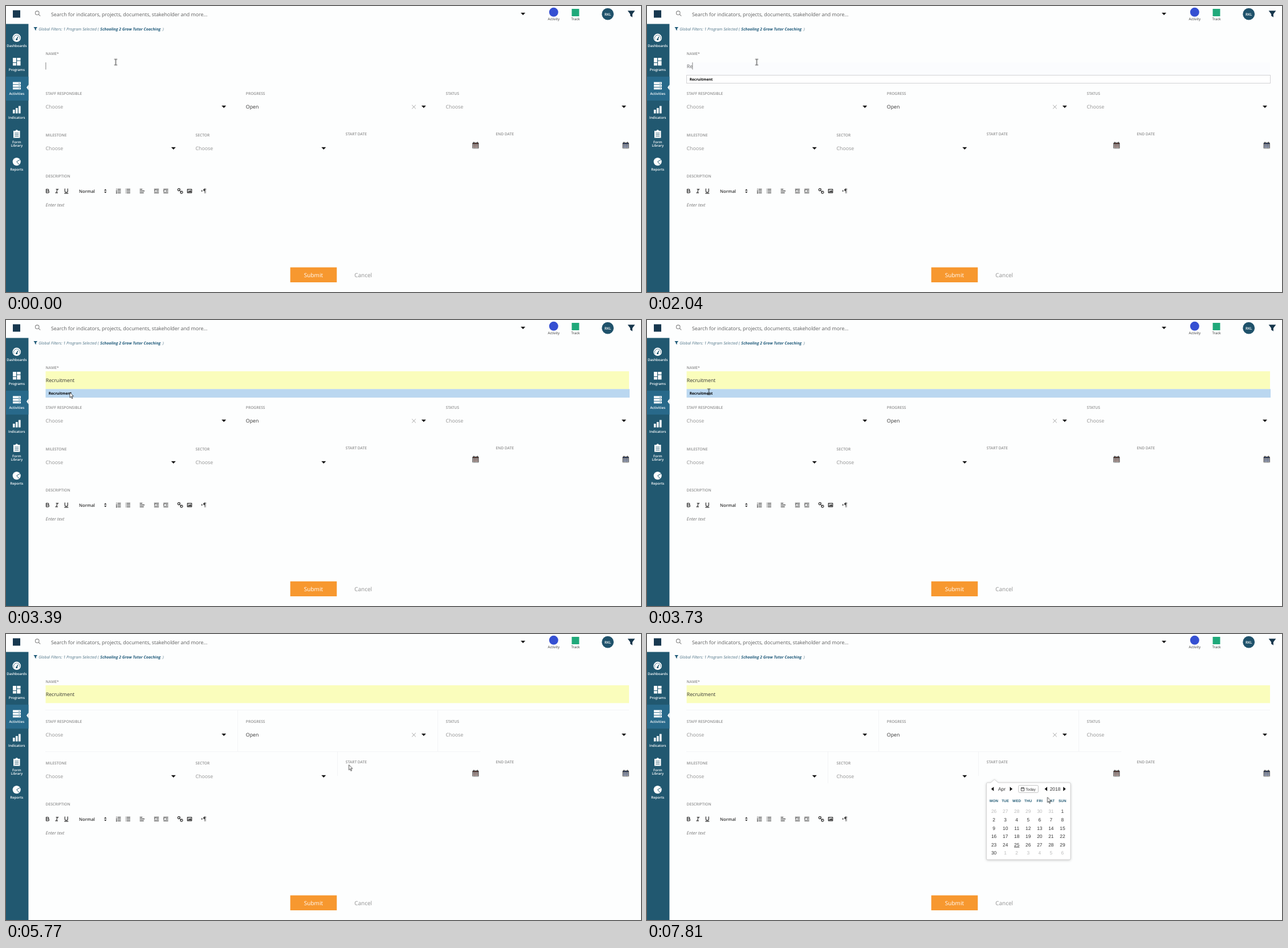
An HTML page for the animation above (8000 ms loop, 1114 by 502 pixels).

```html
<!DOCTYPE html>
<html lang="en">
<head>
<meta charset="utf-8">
<title>Activity form</title>
<style>
  html, body { margin: 0; width: 100%; height: 100%; overflow: hidden; background: #fdfefe; }
  svg { display: block; }
  text { font-family: "Open Sans", "Noto Sans", sans-serif; font-size: 8.8px; text-rendering: geometricPrecision; }
  .mid { text-anchor: middle; }
  .nav text { font-size: 6.1px; font-weight: 600; fill: #fff; text-anchor: middle; }
  .label text { font-size: 6.65px; font-weight: 600; fill: #8e8e8e; }
  .hint text { fill: #919191; }
  .small { font-size: 6.2px; fill: #333; }
  .filter { font-size: 6.9px; font-style: italic; fill: #4f7488; }
  .option { font-size: 6.45px; font-weight: 700; fill: #000; }
  .button { font-size: 10px; text-anchor: middle; }
  .tools { fill: none; stroke: #333; stroke-width: 2; stroke-linecap: round; stroke-linejoin: round; }
  .tools .solid { fill: #333; stroke-width: 1; }
  .lines { stroke: #f3f4f6; fill: none; }
  .picker text { font-family: "Liberation Sans", Arial, sans-serif; font-size: 8.4px; fill: #333; text-anchor: middle; }
  .picker .head { font-size: 6.3px; font-weight: 700; fill: #225b75; letter-spacing: .15px; }
  .picker .off { fill: #bbb; }
  .picker .today { text-decoration: underline; }
  .picker .tiny { font-size: 6.6px; }
  .panel { filter: drop-shadow(0 1px 2px #0003); }

  [data-a] { animation: 8s step-end infinite; }
  [data-a=caret] { animation-name: caret; }
  [data-a=typed] { animation-name: typed; }
  [data-a=option] { animation-name: option; }
  [data-a=hover] { animation-name: hover; }
  [data-a=picked] { animation-name: picked; }
  [data-a=fade] { animation-name: fade; }
  [data-a=rows] { animation-name: rows; }
  [data-a=cols] { animation-name: cols; }
  [data-a=popup] { animation-name: popup; }
  [data-a=move] { animation-name: move; }
  [data-a=beam] { animation-name: beam; }
  [data-a=arrow] { animation-name: arrow; }
  [data-a=hand] { animation-name: hand; }

  @keyframes caret {
    0% { opacity: 1; transform: translate(0); }
    4.375% { opacity: 0; }
    8.5% { opacity: 1; }
    12.875% { opacity: 1; transform: translate(10px); }
    21.375% { opacity: 0; }
    25.5% { opacity: 1; }
    34% { opacity: 0; }
    50.875% { opacity: 1; transform: translate(50px); }
    55.125% { opacity: 0; }
    63.625% { opacity: 1; }
    67.875%, 100% { opacity: 0; transform: translate(50px); }
  }
  @keyframes typed { 0% { opacity: 0; } 12.875% { opacity: 1; } 42.375%, 100% { opacity: 0; } }
  @keyframes option { 0% { opacity: 0; } 12.875% { opacity: 1; } 50.875%, 100% { opacity: 0; } }
  @keyframes hover { 0% { opacity: 0; } 42.375% { opacity: 1; } 50.875%, 100% { opacity: 0; } }
  @keyframes picked { 0% { opacity: 0; } 42.375%, 100% { opacity: 1; } }
  @keyframes fade { 0% { opacity: 0; } 50.875% { opacity: 1; } 63.625%, 100% { opacity: 0; } }
  @keyframes rows { 0% { opacity: 0; } 67.875%, 100% { opacity: 1; } }
  @keyframes cols { 0% { opacity: 0; } 72.125%, 100% { opacity: 1; } }
  @keyframes popup { 0% { opacity: 0; } 89.125%, 100% { opacity: 1; } }
  @keyframes move {
    0% { transform: translate(192.5px, 98.5px); }
    38.25% { transform: translate(183px, 102.5px); }
    42.375% { transform: translate(112px, 127px); }
    46.625% { transform: translate(108.5px, 126px); }
    63.625% { transform: translate(252px, 143px); }
    67.875% { transform: translate(497px, 197px); }
    72.125% { transform: translate(601.5px, 229.5px); }
    76.375% { transform: translate(715px, 250px); }
    80.625% { transform: translate(791px, 246px); }
    84.875% { transform: translate(821px, 244px); }
    93.375% { transform: translate(797.5px, 250px); }
    97.625%, 100% { transform: translate(702.5px, 286.5px); }
  }
  @keyframes beam { 0% { opacity: 1; } 42.375% { opacity: 0; } 46.625% { opacity: 1; } 63.625%, 100% { opacity: 0; } }
  @keyframes arrow {
    0% { opacity: 0; }
    42.375% { opacity: 1; }
    46.625% { opacity: 0; }
    63.625% { opacity: 1; }
    84.875% { opacity: 0; }
    93.375%, 100% { opacity: 1; }
  }
  @keyframes hand { 0% { opacity: 0; } 84.875% { opacity: 1; } 93.375%, 100% { opacity: 0; } }
</style>
</head>
<body>
<svg width="1114" height="502" viewBox="0 0 1114 502">
  <defs>
    <path id="down" d="M-3.5-1.9H3.5L0 1.8Z" fill="#111" stroke="#111" stroke-width=".5" stroke-linejoin="round"/>
    <path id="funnel" d="M-6.4-5.8H6.4L1.9.2V5.8L-1.9 3.2V.2Z" stroke-linejoin="round"/>
    <g id="date">
      <rect x="-5.5" y="-5" width="11" height="10.5" rx="1" fill="#333"/>
      <path d="M-3-6.3v2M3-6.3v2" stroke="#333" stroke-width="1.4"/>
      <path d="M-4.5-1h9M-4.5 1.6h9M-4.5 4.2h9" stroke="#fff" stroke-width="1.6" stroke-dasharray="1.6 .85"/>
      <path d="M-4.5-3h9" stroke="currentColor" stroke-width=".8"/>
      <path d="M-4.5.3h9M-4.5 2.9h9" stroke="currentColor" stroke-width=".7"/>
    </g>
  </defs>

  <!-- top bar -->
  <rect x="12" y="7.5" width="13" height="13" fill="#17384f"/>
  <g fill="none" stroke="#888" stroke-width="1.1">
    <circle cx="54.7" cy="12.2" r="3.3"/><path d="M57.2 14.7l3 3"/>
  </g>
  <text x="79" y="17.6" fill="#5c5c5c">Search for indicators, projects, documents, stakeholder and more...</text>
  <use href="#down" x="907" y="14"/>
  <circle cx="960.8" cy="10.8" r="8" fill="#3550d2"/>
  <rect x="992.5" y="5" width="13" height="13" fill="#20a97a"/>
  <text class="small mid" x="960.8" y="25.4">Activity</text>
  <text class="small mid" x="999" y="25.4">Track</text>
  <circle cx="1055.7" cy="14.2" r="10.4" fill="#1f526b"/>
  <text class="mid" x="1055.7" y="16.6" style="font-size:6.3px;font-weight:600" fill="#fff">RKL</text>
  <use href="#funnel" x="1097" y="14" fill="#17374c"/>
  <use href="#funnel" transform="translate(51.7 40) scale(.52)" fill="#1f5a78"/>
  <text class="filter" x="57.2" y="42.9">Global Filters: 1 Program Selected (</text>
  <text class="filter" x="165.3" y="42.9" style="font-weight:700;fill:#1f5a7a">Schooling 2 Grow Tutor Coaching</text>
  <text class="filter" x="274.8" y="42.9">)</text>

  <!-- sidebar -->
  <path d="M0 31.5H39.4V502H0Z" fill="#215870"/>
  <path d="M0 124H39.4V166H0Z" fill="#28698a"/>
  <path d="M39.6 138v10L36 143Z" fill="#fdfefe"/>
  <g class="nav" fill="#fff">
    <circle cx="18.7" cy="55.8" r="7.3"/>
    <g fill="none" stroke="#215870">
      <path d="M14 58.5a5.2 5.2 0 1 1 9.4 0" stroke-width="1.3" stroke-dasharray="1.3 1.2"/>
      <path d="M18.7 58.6l2-4.6" stroke-width="1.5"/>
    </g>
    <circle cx="18.7" cy="58.6" r="1.7" fill="#215870"/>
    <path d="M12 91h6v8h-6zM12 100h6v4.5h-6zM19.2 91h6.3v4.5h-6.3zM19.2 96.5h6.3v8h-6.3z"/>
    <path d="M12 133.5h14v3.7H12zM12 138.2h14v3.7H12zM12 142.9h14v3.7H12z"/>
    <path d="M22 135.4h2.5M22 140.1h2.5M22 144.8h2.5" stroke="#28698a" stroke-width=".8"/>
    <path d="M12 182h3.6v6.5H12zM17 179h3.6v9.5H17zM22 175.5h3.6v13H22z"/>
    <path d="M13 219h3.4a2.4 2.4 0 0 1 4.6 0h3.5v12.5H13z"/>
    <path d="M15.3 223h7M15.3 225.7h7M15.3 228.4h7" stroke="#215870" stroke-width=".9"/>
    <circle cx="18.7" cy="273.3" r="7"/>
    <path d="M24.8 269.5L18.7 273.3l4.6 5.2" fill="none" stroke="#215870" stroke-width="1"/>
    <text x="18.8" y="72">Dashboards</text>
    <text x="18.8" y="114.1">Programs</text>
    <text x="18.8" y="156.2">Activities</text>
    <text x="18.8" y="198.2">Indicators</text>
    <text x="18.8" y="240.8">Form</text>
    <text x="18.8" y="247.4">Library</text>
    <text x="18.8" y="289.4">Reports</text>
  </g>

  <!-- cell borders -->
  <path class="lines" data-a="rows" d="M69 133.5H1093M69 206.5H832M406.5 133V206"/>
  <path class="lines" data-a="cols" d="M757.5 133V206M581.5 206V249"/>
  <path class="lines" data-a="popup" d="M317.5 206V262"/>

  <!-- name field -->
  <path data-a="typed" d="M69.5 99H1093V121H69.5Z" fill="#fbfcfe"/>
  <path data-a="fade" d="M69.5 121H1093V136H69.5Z" fill="#fbfbfe"/>
  <path data-a="picked" d="M69.5 90H1093V121.3H69.5Z" fill="#fafdbc"/>
  <text data-a="typed" x="69.7" y="108.7" fill="#666">Re</text>
  <text data-a="picked" x="69.7" y="108.7" fill="#333">Recruitment</text>
  <rect data-a="typed" x="69.5" y="121.5" width="1024" height="14" fill="#fff" stroke="#d2d2d4"/>
  <path data-a="hover" d="M69.5 121.3H1094V136.3H69.5Z" fill="#bad7f0"/>
  <text class="option" data-a="option" x="74.8" y="130.9">Recruitment</text>
  <rect data-a="caret" x="69.4" y="99" width=".9" height="12.5" fill="#777"/>

  <!-- form -->
  <g class="label">
    <text x="69.6" y="85.8">NAME*</text>
    <text x="69.6" y="155.5">STAFF RESPONSIBLE</text>
    <text x="420.8" y="155.5">PROGRESS</text>
    <text x="771.6" y="155.5">STATUS</text>
    <text x="69.6" y="228.6">MILESTONE</text>
    <text x="332.6" y="228.6">SECTOR</text>
    <text x="595.8" y="226.6">START DATE</text>
    <text x="859.3" y="226.6">END DATE</text>
    <text x="69.6" y="301">DESCRIPTION</text>
  </g>
  <g class="hint">
    <text x="69.5" y="180.2">Choose</text>
    <text x="771.5" y="180.2">Choose</text>
    <text x="69.5" y="253.3">Choose</text>
    <text x="332.5" y="253.3">Choose</text>
  </g>
  <text x="420.8" y="180.2" fill="#333">Open</text>
  <path d="M712.2 173.8l6.6 6.6m0-6.6l-6.6 6.6" stroke="#999" stroke-width=".9"/>
  <use href="#down" x="382.2" y="177"/>
  <use href="#down" x="732.8" y="177"/>
  <use href="#down" x="1084" y="177"/>
  <use href="#down" x="293.8" y="250"/>
  <use href="#down" x="557.3" y="250"/>
  <use href="#date" x="823.8" y="244.7" color="#a8685c"/>
  <use href="#date" x="1087.2" y="244.7" color="#5470b8"/>

  <!-- editor toolbar -->
  <g class="tools" id="tools"></g>
  <text x="128" y="327.7" style="font-size:7.7px;font-weight:600" fill="#333">Normal</text>
  <path d="M172 324L174.3 321.2 176.6 324ZM172 325.7H176.6L174.3 328.5Z" fill="#333"/>
  <text x="69.6" y="352.2" style="font-size:7.9px;font-style:italic" fill="#777">Enter text</text>

  <path d="M498.7 458.7H580.3V484.9H498.7Z" fill="#f7982f"/>
  <text class="button" x="539.4" y="475.5" fill="#fff">Submit</text>
  <text class="button" x="626.6" y="475.5" fill="#919191">Cancel</text>

  <!-- date picker -->
  <g class="picker" data-a="popup">
    <path class="panel" d="M597.5 261H603L609.5 255.3 616 261H741a2 2 0 0 1 2 2V394a2 2 0 0 1-2 2H597.5a2 2 0 0 1-2-2V263a2 2 0 0 1 2-2Z" fill="#fff" stroke="#ccc" stroke-width=".8"/>
    <path d="M608.3 268.3v7.4L603.8 272ZM636.6 268.3v7.4L641.1 272ZM702.1 268.3v7.4L697.6 272ZM730.2 268.3v7.4L734.7 272Z" fill="#111"/>
    <rect x="651.8" y="265.7" width="34.6" height="12.6" rx="1.8" fill="#fff" stroke="#bbb" stroke-width=".9"/>
    <path d="M656.3 270h5.4v5.2h-5.4zM656.3 271h5.4M657.7 268.6v1.4M660.3 268.6v1.4" fill="none" stroke="#444" stroke-width=".9"/>
    <text x="622.5" y="275">Apr</text>
    <text class="tiny" x="673" y="274.5">Today</text>
    <text x="716" y="275">2018</text>
    <g id="days"></g>
  </g>

  <!-- pointer -->
  <g data-a="move">
    <path data-a="beam" d="M-2.5-5H-.6L0-4.5.6-5H2.5M0-4.5V4.5M-2.5 5H-.6L0 4.5.6 5H2.5" fill="none" stroke="#222"/>
    <path data-a="arrow" d="M0 0V9.2L2.1 7.3 3.6 10.8 5 10.2 3.5 6.7H6.4Z" fill="#fff" stroke="#222" stroke-width=".8"/>
    <path data-a="hand" d="M0 1.2a.9.9 0 0 1 1.8 0V5l3.6.7c.6.2.8.6.7 1.2l-.7 5H0L-2.6 8.4c0-1 .9-1.4 1.6-.8L0 8.4Z" fill="#fff" stroke="#222" stroke-width=".8"/>
  </g>
</svg>
<script>
  const fill = (id, parts) => document.getElementById(id).innerHTML = parts.join('');
  const stroke = d => `<path d="${d}"/>`;
  const solid = d => `<path class="solid" d="${d}"/>`;
  const icon = (x, body) =>
    `<svg x="${x - 5.6}" y="319.1" width="11.2" height="11.2" viewBox="0 0 18 18">${body}</svg>`;

  fill('tools', [
    icon(73, stroke('M5 4H9.5a2.5 2.5 0 0 1 0 5H5ZM5 9h5.5a2.5 2.5 0 0 1 0 5H5Z')),
    icon(89.3, stroke('M7 4h6M5 14h6M8 14L10 4')),
    icon(105.8, stroke('M5 3V9a4 4 0 0 0 8 0V3M4 15.7H14')),
    icon(197.3, stroke('M7 4h8M7 9h8M7 14h8') + solid('M3.5 2.5v3M2.5 8h2L2.5 10.5h2M2.5 13h2v2.5h-2')),
    icon(213.8, stroke('M6 4h9M6 9h9M6 14h9M3 4h0M3 9h0M3 14h0')),
    icon(238.8, stroke('M3 4H9M3 9H15M3 14H13')),
    icon(264, stroke('M3 4H15M9 9H15M3 14H15') + solid('M5 7v4L3 9Z')),
    icon(280.4, stroke('M3 4H15M9 9H15M3 14H15') + solid('M3 7v4L5 9Z')),
    icon(305.6, stroke('M7 7l4 4M8.9 4.6a3.5 3.5 0 1 0-4.3 4.3ZM13.4 9.1a3.5 3.5 0 1 1-4.3 4.3Z')),
    icon(322, stroke('M3 4H15V14H3Z') + solid('M5 12V11L7 9 8 10 11 7 13 9V12ZM6 6.5h.5v.5H6Z')),
    icon(347, solid('M3 7v4L5 9ZM11 3a3 3 0 0 0 0 6h1V3ZM11.5 3.5V15M14 3.5V15M11 3.5h4.5'))
  ]);

  const col = i => 608.6 + 20.05 * (i % 7);
  const heads = 'MON TUE WED THU FRI SAT SUN'.split(' ')
    .map((name, i) => `<text class="head" x="${col(i)}" y="295.2">${name}</text>`);
  const days = Array.from({ length: 42 }, (_, i) => {
    const n = i - 5;
    const day = n < 1 ? n + 31 : n > 30 ? n - 30 : n;
    const kind = day !== n ? 'off' : n === 25 ? 'today' : '';
    return `<text class="${kind}" x="${col(i)}" y="${314.4 + 14.6 * Math.floor(i / 7)}">${day}</text>`;
  });
  fill('days', [...heads, ...days]);
</script>
</body>
</html>
```
